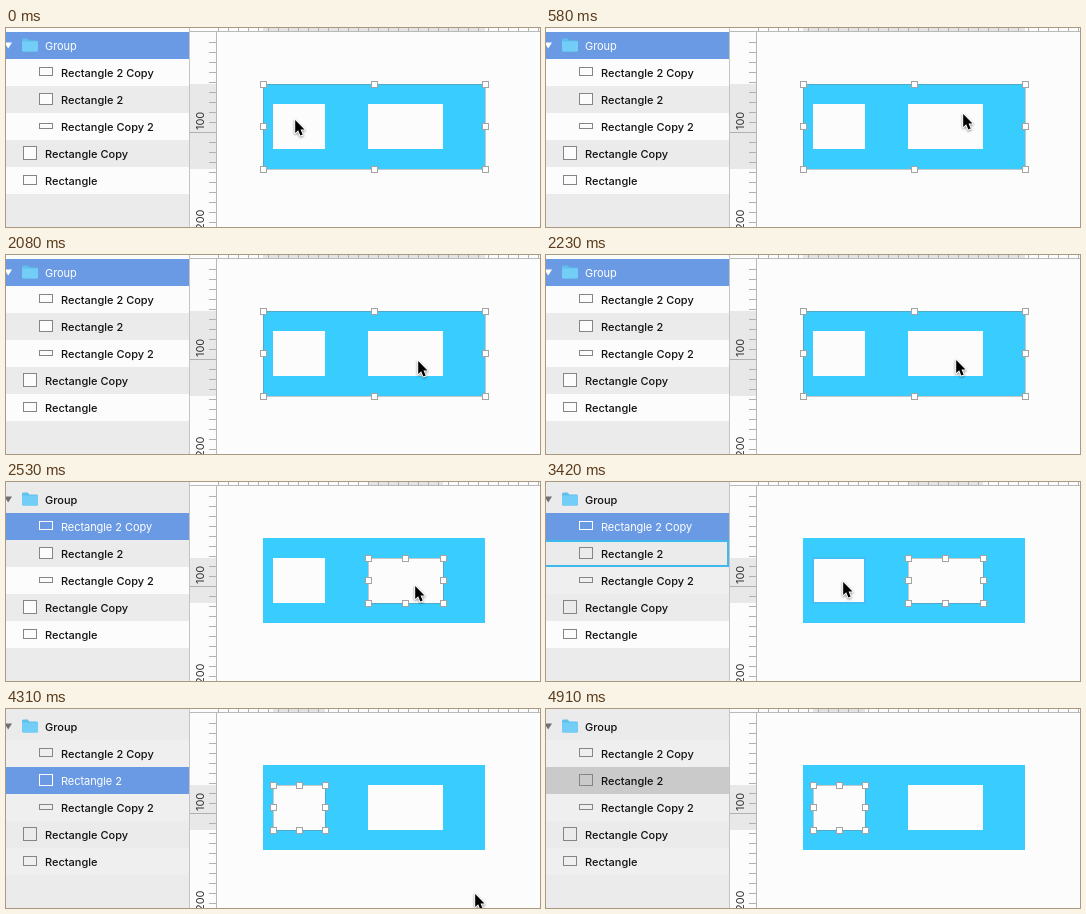
Animation, 534 px wide and 199 px high, one loop 5.01 s. Source, as an HTML page:

```html
<!DOCTYPE html>
<html lang="en">
<head>
<meta charset="utf-8">
<title>Layer selection</title>
<style>
  html, body { margin: 0; width: 100%; height: 100%; overflow: hidden; background: #fcfcfc; }
  svg { display: block; width: 100%; height: 100%; }
  text { font: 500 11px Inter, "Open Sans", sans-serif; }
  text.lit { font-weight: 400; letter-spacing: -.06px; }
  #cursor { filter: drop-shadow(.5px 1px .8px rgba(0, 0, 0, .45)); }
</style>
</head>
<body>
<svg id="stage" viewBox="0 0 534 199"></svg>
<script>
const NS = 'http://www.w3.org/2000/svg';
const stage = document.getElementById('stage');
const LOOP = 5010, ROW = 27, TOP = 4;
const BLUE = '#6a9ae4', CYAN = '#38ccff', PALE = '#ebebeb', SOFT = '#efefef', WHITE = '#fcfcfc';

function set(el, attrs) {
  for (const k in attrs) el.setAttribute(k, attrs[k]);
  return el;
}
function add(tag, attrs, parent = stage) {
  return parent.appendChild(set(document.createElementNS(NS, tag), attrs));
}
function box(x, y, width, height, fill) {
  return add('rect', { x, y, width, height, fill });
}
function label(x, y, str, more = {}) {
  const el = add('text', { x, y, fill: '#111', ...more });
  el.textContent = str;
  return el;
}
const show = (el, on) => set(el, { visibility: on ? 'visible' : 'hidden' });

// Canvas shapes: x, y, width, height
const shapes = {
  group: [257, 56, 222, 85],
  wide: [362, 76, 75, 45],
  square: [267, 76, 52, 45]
};
box(0, 0, 534, 199, WHITE);
box(...shapes.group, CYAN);
box(...shapes.wide, WHITE);
box(...shapes.square, WHITE);
const hoverShape = add('rect', {
  x: 267, y: 76, width: 52, height: 45, fill: 'none', stroke: '#42bff4', 'stroke-width': 2
});

// Rulers, one tick every ten pixels
box(184, 0, 350, 3, WHITE);
box(184, 0, 27, 199, WHITE);
const spanX = box(0, 0, 0, 3, '#e4e4e4');
const spanY = box(184, 0, 26, 0, '#e8e8e8');
let ticks = 'M184 104.5H210';
for (let y = 14.5; y < 199; y += 10) ticks += `M203 ${y}H210`;
for (let x = 212.5; x < 534; x += 10) ticks += `M${x} 0V3`;
add('path', { d: ticks, stroke: '#b0b0b0' });
add('path', { d: 'M210.5 3V199M184 3.5H534', stroke: '#b9b9b9' });
for (const n of [100, 200])
  label(0, 0, n, { transform: `translate(198 ${n + 2}) rotate(-90)`, fill: '#333', class: 'lit' });

// Layer list
box(0, 0, 183, 199, PALE);
const topStrip = box(0, 0, 183, TOP, WHITE);
const rows = [
  ['Group', 39],
  ['Rectangle 2 Copy', 55, 33.5, 39.5, 13, 8],
  ['Rectangle 2', 55, 33.5, 65.5, 13, 11],
  ['Rectangle Copy 2', 55, 33.5, 95.5, 13, 5],
  ['Rectangle Copy', 39, 17.5, 118.5, 13, 13],
  ['Rectangle', 39, 17.5, 147.5, 13, 9]
].map(([name, tx, x, y, width, height], i) => {
  const bg = box(0, TOP + i * ROW, 183, ROW, PALE);
  const icon = i
    ? add('rect', { x, y, width, height, stroke: '#858585' })
    : add('path', { d: 'M-1.5 14.5H6L2.2 20.5Z' });
  return { bg, icon, text: label(tx, 22 + i * ROW, name) };
});
add('path', { d: 'M16 12q0-1.500 1.500-1.500h4l2 2h7q1.500 0 1.500 1.500v8q0 1.500-1.500 1.500H17.500q-1.500 0-1.500-1.500Z', fill: '#5fc0ec' });
add('path', { d: 'M16 13.500H32V22q0 1.500-1.500 1.500H17.500q-1.500 0-1.500-1.500Z', fill: '#72cef6' });
const hoverRow = add('path', { d: 'M0 59H182V84H0', fill: 'none', stroke: '#3db9ec', 'stroke-width': 2 });
box(183, 0, 1, 199, '#c4c4c4');

// Selection frame with eight handles
const outline = add('rect', { fill: 'none', stroke: '#777', 'stroke-opacity': .4 });
const handles = Array.from({ length: 8 }, () =>
  add('rect', { width: 6, height: 6, fill: '#fff', stroke: '#a3a3a3' }));
const spots = [0, 1, 2, 3, 5, 6, 7, 8].map(n => [n % 3 / 2, Math.floor(n / 3) / 2]);

const cursor = add('g', { id: 'cursor' });
add('path', {
  d: 'M0 0V14.500L3.300 11.500L5.700 17.300L8.300 16.200L5.900 10.600H10.300Z',
  transform: 'translate(.2 1) scale(.9)',
  stroke: '#fff', 'stroke-width': 2, 'paint-order': 'stroke', 'stroke-linejoin': 'round'
}, cursor);

// Pointer tip: time, x, y
const track = [
  [0, 289, 91], [150, 304, 82], [300, 345, 73], [430, 392, 75], [580, 417, 85],
  [1030, 428, 88], [1180, 436, 89], [1330, 414, 81],
  [1630, 416, 87], [1780, 417, 95], [1930, 414, 102], [2080, 412, 105],
  [2230, 410, 104], [2380, 409, 103],
  [3130, 374, 100], [3280, 312, 98], [3420, 297, 99],
  [4010, 352, 124], [4160, 443, 163], [4310, 469, 184], [4460, 500, 220]
];
// Selection: time, shape, row
const picks = [[0, 'group', 0], [2530, 'wide', 1], [3710, 'square', 2]];
const at = (list, t) => list.findLast(k => k[0] <= t);

function rowFill(i, t) {
  if (i === 5) return t < 4010 ? WHITE : SOFT;
  if (i === 1 || i === 3) return t < 3280 ? WHITE : SOFT;
  return PALE;
}

function draw(t) {
  const [, x, y] = at(track, t);
  set(cursor, { transform: `translate(${x} ${y})` });

  const [, key, picked] = at(picks, t);
  const [sx, sy, w, h] = shapes[key];
  set(spanX, { x: sx, width: w });
  set(spanY, { y: sy, height: h });
  set(outline, { x: sx + .5, y: sy + .5, width: w, height: h });
  handles.forEach((el, i) => set(el, {
    x: Math.floor(sx + spots[i][0] * w) - 2.5,
    y: Math.floor(sy + spots[i][1] * h) - 2.5
  }));

  const faded = t >= 4910;
  set(topStrip, { fill: picked ? PALE : WHITE });
  rows.forEach(({ bg, icon, text }, i) => {
    const on = i === picked, lit = on && !faded;
    const plain = on ? '#cacaca' : rowFill(i, t);
    set(bg, { fill: lit ? BLUE : plain });
    set(text, { fill: lit ? '#fff' : '#111', class: lit ? 'lit' : '' });
    if (i) set(icon, { fill: lit ? BLUE : t < 3280 ? WHITE : plain, stroke: lit ? '#fff' : '#858585' });
    else set(icon, { fill: lit ? '#fff' : '#707070' });
  });

  const hover = t >= 3280 && t < 3710;
  show(hoverRow, hover);
  show(hoverShape, hover);
}

const start = performance.now();
function tick() {
  draw((performance.now() - start) % LOOP);
  requestAnimationFrame(tick);
}
tick();
</script>
</body>
</html>
```
